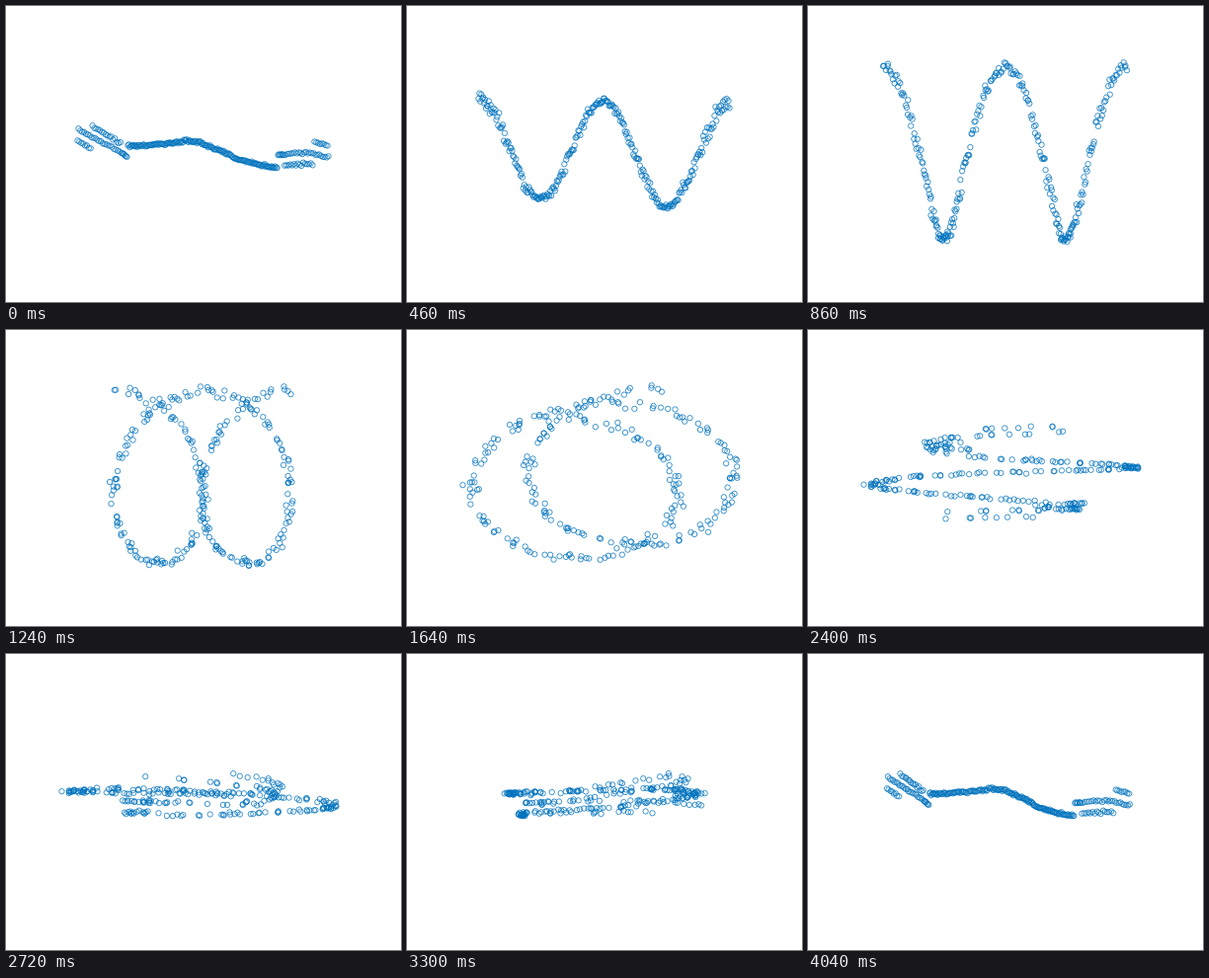
These frames come from a looping animation (400 by 300 pixels, 4.06 s). An HTML page with a canvas:

```html
<!DOCTYPE html>
<html>
<head>
<meta charset="utf-8">
<style>
html, body { margin: 0; width: 100%; height: 100%; overflow: hidden; background: #fff; }
canvas { display: block; }
</style>
</head>
<body>
<canvas id="stage" width="400" height="300"></canvas>
<script>
const ctx = document.getElementById('stage').getContext('2d');
const LOOP = 4060, STEP = 20, COUNT = 270;

let seed = 11;
function rand() {
  seed = (seed * 16807) % 2147483647;
  return seed / 2147483647;
}
const noise = size => (rand() + rand() + rand() - 1.5) * 2 * size;

// Piecewise linear value through [position, value] pairs
function along(keys, p) {
  let i = 1;
  while (i < keys.length - 1 && p > keys[i][0]) i++;
  const [p0, v0] = keys[i - 1], [p1, v1] = keys[i];
  return v0 + (v1 - v0) * (p - p0) / (p1 - p0);
}

const ribbon = [[124, 142], [150, 141], [178, 138], [181, 136], [195, 138],
  [215, 146], [235, 155], [255, 161], [275, 164]];
const rightStrip = [[275, 151], [305, 148.5], [327, 153]];

// Fourth dimension: a ribbon that splits into parallel strips at both ends
function ribbonY(x, lane) {
  if (x < 123) {
    if (x < 86 && lane === 1) return 136 + 0.55 * (x - 71);
    if (x > 87 && x < 117 && lane === 1) return 122 + 0.586 * (x - 87);
    return 124 + 0.56 * (x - 72);
  }
  if (x <= 275) return along(ribbon, x);
  if (x > 312 && lane === 1) return 137 + 0.35 * (x - 312);
  if (x > 282 && x < 311 && lane === 1) return 161 - 0.03 * (x - 282);
  return along(rightStrip, x);
}

const points = [];
for (let i = 0; i < COUNT; i++) {
  const rank = (i + 0.5) / COUNT;
  const turn = 2 * Math.min(1, Math.max(0, rank + (rand() - 0.5) * 5 / COUNT));
  const angle = 2 * Math.PI * turn;
  const order = 327 - 255 * rank;
  const cos = 109 * Math.cos(angle) + noise(3);
  points.push({
    order,
    sineX: 256 - 57 * turn - 119 * Math.sin(angle) + noise(3.5),
    cosX: 199 + cos,
    cosY: 149 - 0.8 * cos,
    axisY: 47.5 + 102 * turn + noise(0.8),
    ribbonY: ribbonY(order, i % 2) + noise(0.7)
  });
}

const xKeys = [[0, 'order'], [820, 'order'], [1575, 'sineX'], [2720, 'sineX'],
  [3430, 'cosX'], [LOOP, 'order']];
const yKeys = [[0, 'ribbonY'], [820, 'cosY'], [1575, 'cosY'], [2040, 'axisY'],
  [2720, 'ribbonY'], [LOOP, 'ribbonY']];

const place = (keys, point, t) => along(keys.map(([at, name]) => [at, point[name]]), t);

function draw(now) {
  const t = Math.floor((now % LOOP) / STEP) * STEP;
  ctx.fillStyle = '#fff';
  ctx.fillRect(0, 0, 400, 300);
  ctx.strokeStyle = '#0072bd';
  ctx.lineWidth = 0.75;
  for (const point of points) {
    ctx.beginPath();
    ctx.arc(place(xKeys, point, t), place(yKeys, point, t), 2.7, 0, 2 * Math.PI);
    ctx.stroke();
  }
}

const start = performance.now();
function tick() {
  draw(performance.now() - start);
  requestAnimationFrame(tick);
}
tick();
</script>
</body>
</html>
```
